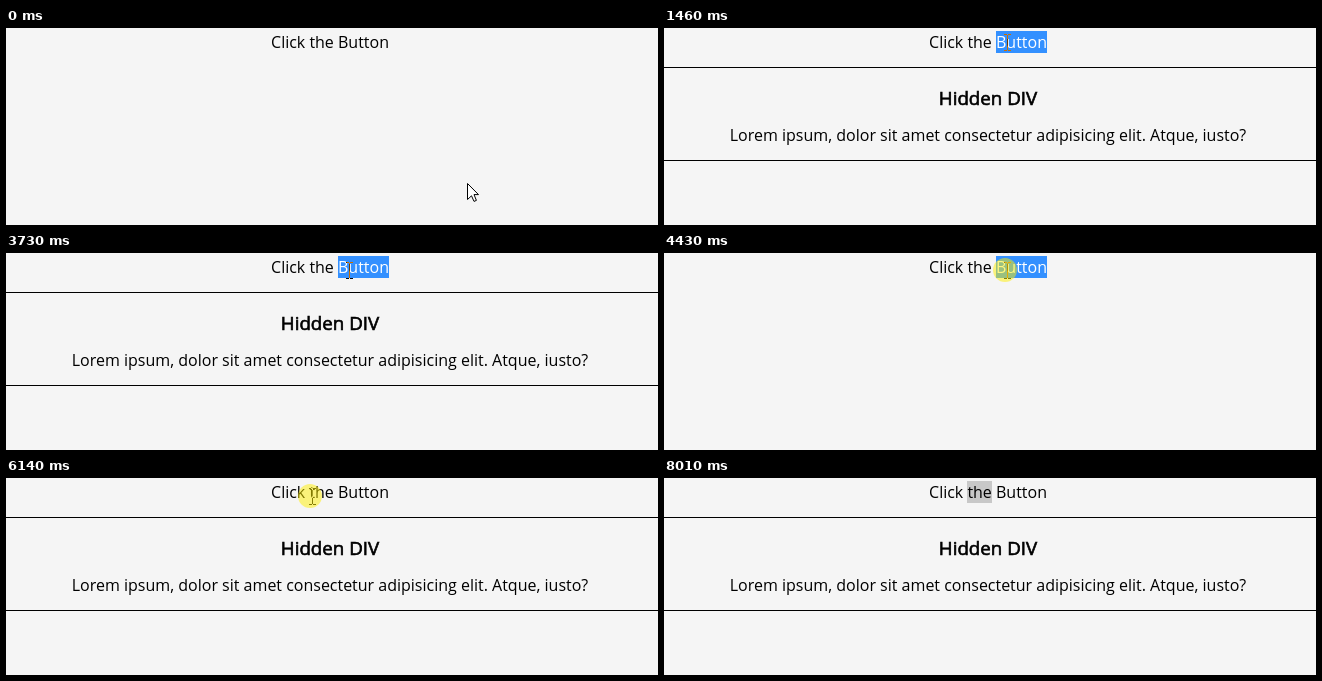
These frames come from a looping animation (652 px wide and 197 px high, 8.79 s). An HTML page:

```html
<!DOCTYPE html>
<html lang="en">
<head>
<meta charset="utf-8">
<title>Toggle a hidden div</title>
<style>
  html, body { margin: 0; width: 100%; height: 100%; overflow: hidden; background: #f5f5f5; }
  #stage {
    position: relative; width: 652px; height: 197px; overflow: hidden; background: #f5f5f5;
    font: 16px/22px "Open Sans", sans-serif; color: #000; isolation: isolate;
  }
  #stage > *, #panel > * { position: absolute; left: 0; margin: 0; }
  p, h3 { width: 648px; text-align: center; white-space: pre; }
  #label { top: 3px; }
  #panel { top: 39px; width: 652px; height: 92px; border: solid #000; border-width: 1px 0; }
  h3 { top: 17px; font-size: 18.72px; font-weight: 400; line-height: 26px; -webkit-text-stroke: .65px #000; }
  #panel p { top: 56px; }
  .active { background: #3390ff; color: #fff; }
  .inactive { background: #c8c8c8; }
  #beam { mix-blend-mode: difference; }
  #ring { width: 24px; height: 24px; border-radius: 50%; background: rgba(255, 240, 0, .5); }
</style>
</head>
<body>
<div id="stage">
  <p id="label">Click <span id="the">the</span><span id="gap"> </span><span id="button">Button</span></p>
  <div id="panel">
    <h3>Hidden DIV</h3>
    <p>Lorem ipsum, dolor sit amet consectetur adipisicing elit. Atque, iusto?</p>
  </div>
  <svg id="arrow" width="12" height="19">
    <path d="M.5 .5V16.5L4.5 12.8L7 18.4L9.4 17.4L7 11.6H11.5Z" fill="#fff" stroke="#000"/>
  </svg>
  <svg id="beam" width="7" height="17" shape-rendering="crispEdges">
    <path d="M0 0h3v1h1v-1h3v1h-3v15h3v1h-3v-1h-1v1h-3v-1h3v-15h-3z" fill="#fff"/>
  </svg>
  <div id="ring"></div>
</div>
<script>
const LOOP = 8790;
const el = id => document.getElementById(id);
const at = (x, y) => ({ x, y });
const arrow = (x, y) => ({ cursor: "arrow", x, y });
const press = { pressed: true };
const release = open => ({ pressed: false, open });

// Each entry changes only the listed parts of the state.
const steps = [
  [0, { ...arrow(461, 155), pressed: false, open: false, selected: "" }],
  [70, arrow(446, 130)],
  [150, arrow(405, 82)],
  [230, arrow(365, 46)],
  [300, { cursor: "beam", x: 344, y: 24 }],
  [380, press],
  [530, release(true)],
  [690, at(344, 20)],
  [760, at(344, 16)],
  [990, { ...at(343, 15), ...press }],
  [1070, release(false)],
  [1390, { ...at(343, 14), ...press, selected: "button" }],
  [1460, release(true)],
  [1930, press],
  [2100, { ...release(false), selected: "" }],
  [2330, { ...press, selected: "button" }],
  [2420, release(true)],
  [3730, at(343, 17)],
  [3810, press],
  [3970, release(false)],
  [4430, press],
  [4510, { ...release(true), selected: "" }],
  [4580, at(324, 18)],
  [4660, at(306, 18)],
  [6140, press],
  [6290, release(false)],
  [6610, { ...press, selected: "the" }],
  [6760, release(true)],
  [6930, arrow(318, 32)],
  [7010, arrow(350, 66)],
  [7080, arrow(396, 104)],
  [7160, arrow(450, 140)],
  [7230, arrow(508, 168)],
  [7310, arrow(552, 185)],
  [7690, { ...arrow(607, 195), selected: "blurred" }],
  [7860, at(617, 195)],
  [7930, at(597, 195)],
  [8010, { cursor: "" }]
];

function place(id, visible, x, y) {
  const { style } = el(id);
  style.visibility = visible ? "visible" : "hidden";
  style.transform = `translate(${x}px, ${y}px)`;
}

function draw(time) {
  const s = Object.assign({}, ...steps.filter(([t]) => t <= time).map(([, change]) => change));
  el("panel").style.visibility = s.open ? "visible" : "hidden";
  el("button").className = s.selected === "button" ? "active" : "";
  el("gap").className = s.selected === "the" ? "active" : "";
  el("the").className = s.selected === "blurred" ? "inactive" : el("gap").className;
  place("arrow", s.cursor === "arrow", s.x, s.y);
  place("beam", s.cursor === "beam", s.x - 3, s.y - 8);
  place("ring", s.pressed, s.x - 14, s.y - 12);
}

const start = performance.now();
function tick() {
  draw((performance.now() - start) % LOOP);
  requestAnimationFrame(tick);
}
tick();
</script>
</body>
</html>
```
